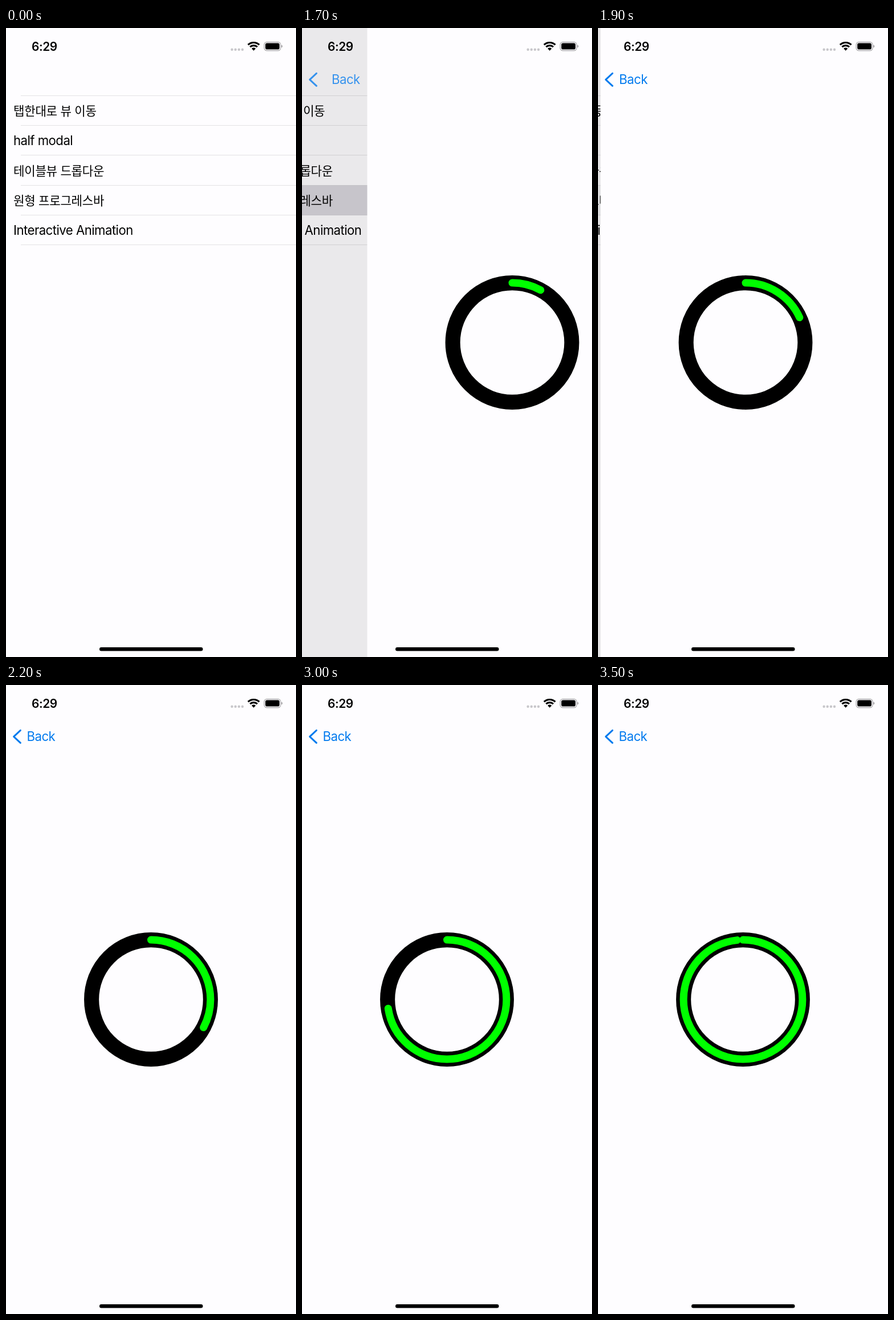
Recreate the animation shown at these times as an HTML page. Size 509x1101 px, loop 3600 ms.

```html
<!DOCTYPE html>
<html lang="ko">
<head>
<meta charset="utf-8">
<title>Circular progress</title>
<style>
  html, body { margin: 0; height: 100%; overflow: hidden; background: #fefdff; }
  svg { display: block; width: 100vw; height: 100vh; }
  text { font: 22.2px Inter, "Noto Sans CJK KR", "Noto Sans CJK", sans-serif; font-optical-sizing: none; letter-spacing: -.54px; }
  .ko { font-size: 21.2px; letter-spacing: -.3px; }
  .time { font-size: 20.9px; font-weight: 600; letter-spacing: -.4px; }
  .stroke { fill: none; stroke-linecap: round; stroke-linejoin: round; }
</style>
</head>
<body>
<svg viewBox="0 0 509 1101">
  <g id="list">
    <g id="rows"></g>
    <rect id="highlight" y="275" width="509" height="53" fill="#d0cfd5"/>
    <g id="labels"></g>
  </g>
  <rect id="dim" width="509" height="1101"/>

  <g id="page">
    <rect width="509" height="1101" fill="#fefdff"/>
    <circle cx="254.5" cy="550.5" r="104.4" fill="none" stroke="#000" stroke-width="26.1"/>
    <circle id="progress" class="stroke" cx="254.5" cy="550.5" r="104.4" stroke="#0f0" stroke-width="13.05"
      pathLength="360" transform="rotate(-90 254.5 550.5)"/>
  </g>

  <g id="back" fill="#027aee">
    <path class="stroke" d="M25.4 79.3L13.6 90.3L25.4 101.3" stroke="#027aee" stroke-width="3"/>
    <text id="backLabel" y="98">Back</text>
  </g>

  <text class="time" x="45" y="40">6:29</text>
  <g fill="#c8c7cb">
    <circle cx="396.6" cy="37.8" r="2.2"/><circle cx="402.7" cy="37.8" r="2.2"/>
    <circle cx="408.9" cy="37.8" r="2.2"/><circle cx="415" cy="37.8" r="2.2"/>
  </g>
  <g id="wifi" fill="none" stroke="#000"></g>
  <rect x="453.2" y="24.6" width="28.8" height="15" rx="4.6" fill="none" stroke="#a09fa2" stroke-width="1.2"/>
  <rect x="455.2" y="26.6" width="24.8" height="11" rx="2.8"/>
  <path d="M483.4 29.6Q485.4 30.4 485.4 32.1T483.4 34.6Z" fill="#a09fa2"/>
  <rect x="164" y="1084" width="181.5" height="6.5" rx="3.25"/>
</svg>
<script>
const $ = id => document.getElementById(id);
const W = 509, LOOP = 3600, STEP = 100, PUSH = 1600;

const titles = ['탭한대로 뷰 이동', 'half modal', '테이블뷰 드롭다운', '원형 프로그레스바', 'Interactive Animation'];
const rowTop = i => 118.5 + 52.2 * i;
for (let i = 0; i <= titles.length; i++)
  $('rows').innerHTML += `<rect x="26" y="${Math.floor(rowTop(i))}" width="483" height="1" fill="#e3e2e4"/>`;
$('labels').innerHTML = titles.map((title, i) =>
  `<text x="13" y="${rowTop(i) + 34.6}" class="${/[가-힣]/.test(title) ? 'ko' : ''}">${title}</text>`).join('');

// Wi-Fi arcs: radius and stroke width
$('wifi').innerHTML = [[14.3, 3.2], [9.2, 3.2], [2.6, 5.2]].map(([r, w]) => {
  const dx = .69 * r, y = 39.8 - .724 * r;
  return `<path d="M${434.7 - dx} ${y}A${r} ${r} 0 0 1 ${434.7 + dx} ${y}" stroke-width="${w}"/>`;
}).join('');

const slide = [381.5, 114.5, 23.5, 4.5, 1, 0];
const highlight = [1, .82, .5, .2, 0, 0];
const sweep = [[1600, 10], [1700, 28.5], [1800, 47.6], [2200, 118], [3000, 261.3], [3500, 354.2]];

function angleAt(t) {
  const i = Math.max(1, sweep.findIndex(([time]) => time >= t));
  const [t0, a0] = sweep[i - 1], [t1, a1] = sweep[i];
  return a0 + (a1 - a0) * (t - t0) / (t1 - t0);
}

function draw(now) {
  const t = Math.floor(now % LOOP / STEP) * STEP;
  const pushed = t >= PUSH;
  const step = Math.min((t - PUSH) / STEP, slide.length - 1);
  const x = pushed ? slide[step] : W;
  const shown = 1 - x / W;

  $('list').setAttribute('transform', `translate(${-.3 * (W - x)})`);
  $('highlight').setAttribute('opacity', pushed ? highlight[step] : 0);
  $('dim').setAttribute('opacity', .1 * shown);
  $('page').setAttribute('transform', `translate(${x})`);
  $('back').setAttribute('opacity', shown);
  $('backLabel').setAttribute('x', 36.5 + .136 * x);
  $('progress').setAttribute('stroke-dasharray', `${pushed ? angleAt(t) : 0} 720`);
  requestAnimationFrame(frame);
}

const start = performance.now();
function frame() { draw(performance.now() - start); }
frame();
</script>
</body>
</html>
```
